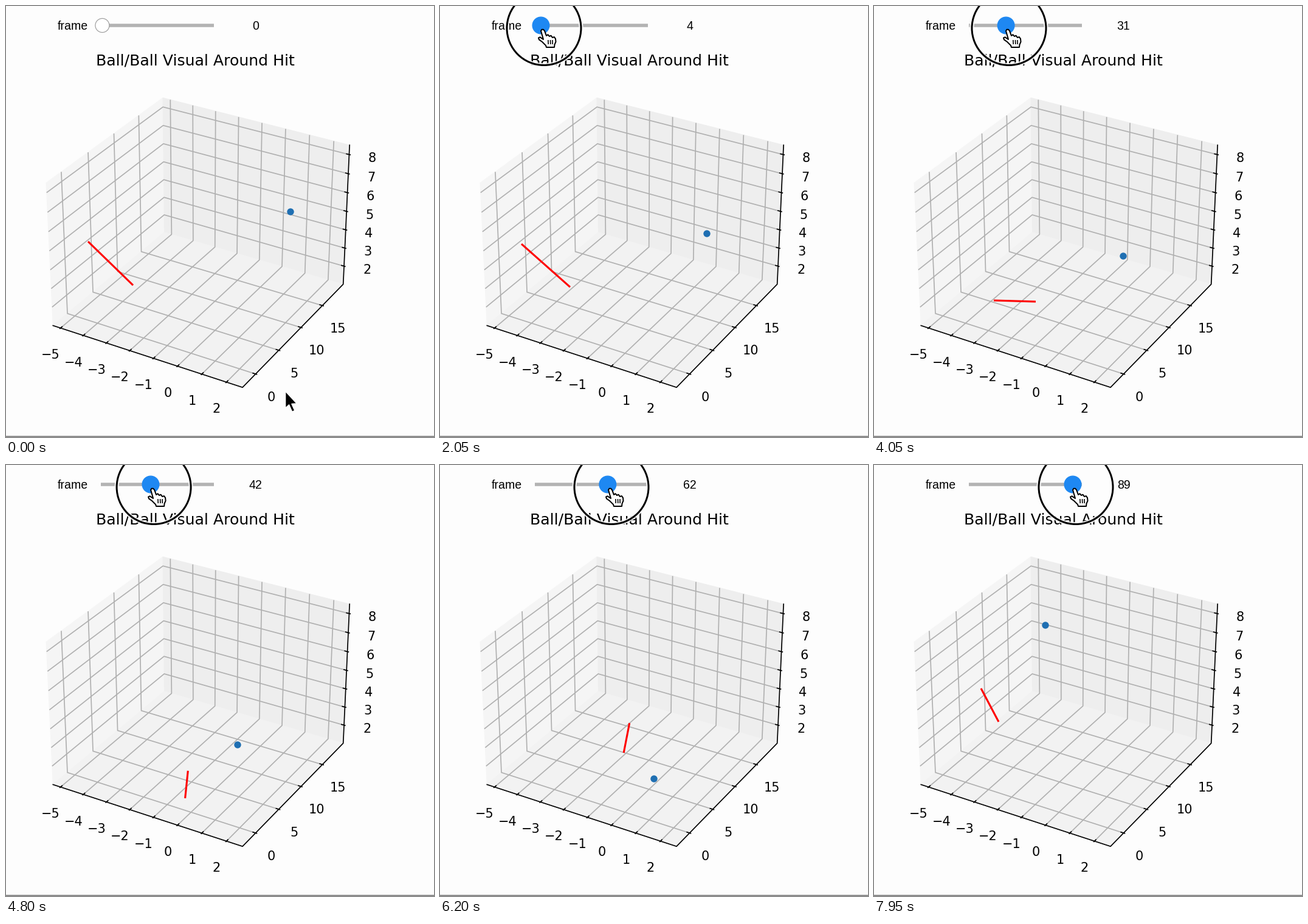
Animation of 704 by 710 pixels, one loop 8000 ms. Source, as a matplotlib script:

```python
import numpy as np
import matplotlib.pyplot as plt
from matplotlib.animation import FuncAnimation
from matplotlib.patches import Circle, Polygon

W, H, DPI = 704, 710, 64
STEP, FRAMES = 50, 160
PT = 72 / DPI  # points per pixel

fig = plt.figure(figsize=(W / DPI, H / DPI), dpi=DPI, facecolor="#fdfdfd")
ax = fig.add_axes([0, 0, 1, 1])
ax.set_xlim(0, W)
ax.set_ylim(H, 0)
ax.axis("off")


def label(x, y, text, size, font="DejaVu Sans", ha="center", z=4):
    return ax.text(x, y, text, fontsize=size * PT, family=font, ha=ha,
                   va="baseline", color="black", zorder=z)


def stroke(points, color, width, z, cap="butt"):
    xs, ys = zip(*points)
    return ax.plot(xs, ys, color=color, lw=width * PT, zorder=z,
                   solid_capstyle=cap, solid_joinstyle="round")[0]


# --- 3D box: perspective camera at elevation 30, azimuth -60 ---
LO = np.array([-5.334, -2.736, 0.9885])
HI = np.array([2.6445, 20.056, 8.49])
SPAN = HI - LO
HALF = np.array([4, 4, 3]) / 7
RIGHT = np.array([0.866, 0.5, 0])
UP = np.array([-0.25, 0.433, 0.866])
TOWARD = np.array([0.433, -0.75, 0.5])


def project(point):
    p = (2 * (np.array(point) - LO) / SPAN - 1) * HALF
    depth = 9.6 - TOWARD @ p
    return 320.4 + 3000 * (RIGHT @ p) / depth, 378.3 - 3000 * (UP @ p) / depth


def path(*points):
    return [project(p) for p in points]


x0, y0, z0 = LO
x1, y1, z1 = HI

panes = [
    ("#f5f5f5", path((x0, y0, z0), (x0, y1, z0), (x0, y1, z1), (x0, y0, z1))),
    ("#eeeeee", path((x0, y1, z0), (x1, y1, z0), (x1, y1, z1), (x0, y1, z1))),
    ("#f2f2f2", path((x0, y0, z0), (x1, y0, z0), (x1, y1, z0), (x0, y1, z0))),
]
for color, corners in panes:
    ax.add_patch(Polygon(corners, fc=color, ec=color, lw=PT, zorder=1))


def tick(point, axis, outward, offset):
    """Short mark across the box edge, with its number beside it."""
    ends = []
    for amount in (0.008 * outward, -0.016 * outward):
        end = np.array(point, float)
        end[axis] += amount * SPAN[axis]
        ends.append(project(end))
    stroke(ends, "black", 1.7, 4)
    px, py = project(point)
    return px + offset[0], py + offset[1] + 7.6


def number(n):
    return str(n).replace("-", "\u2212")


GRID, TICK_SIZE = "#b0b0b0", 20.9
for x in range(-5, 3):
    stroke(path((x, y0, z0), (x, y1, z0), (x, y1, z1)), GRID, 1.7, 2)
    label(*tick((x, y0, z0), 1, -1, (-16.2, 43.2)), number(x), TICK_SIZE)
for y in range(0, 16, 5):
    stroke(path((x1, y, z0), (x0, y, z0), (x0, y, z1)), GRID, 1.7, 2)
    label(*tick((x1, y, z0), 0, 1, (25.5, 37.3)), number(y), TICK_SIZE)
for z in range(2, 9):
    stroke(path((x0, y0, z), (x0, y1, z), (x1, y1, z)), GRID, 1.7, 2)
    label(*tick((x1, y1, z), 0, 1, (37.9, 4.7)), number(z), TICK_SIZE)
stroke(path((x0, y0, z0), (x1, y0, z0), (x1, y1, z0), (x1, y1, z1)),
       "black", 1.7, 4, "projecting")

label(311.8, 98, "Ball/Ball Visual Around Hit", 25.1)
stroke([(0, 709), (W, 709)], "#777777", 1.6, 4)

# --- slider ---
label(84.5, 39.3, "frame", 19.5, "Liberation Sans", "left")
stroke([(156, 32), (342, 32)], "#b3b3b3", 5.5, 4)
readout = label(410.5, 39.3, "0", 19.5, "Liberation Sans")
knob = ax.add_patch(Circle((158, 32), 11.5, lw=1.2 * PT, zorder=6))
BLUE = "#1e88f2"

# --- moving parts of the plot ---
bat = stroke([(0, 0), (1, 1)], "red", 3.1, 5)
ball = ax.add_patch(Circle((0, 0), 5.7, fc="#1f6fb2", lw=0, zorder=5))

# --- pointer ---
halo = ax.add_patch(Circle((0, 0), 61, fc="none", ec="white", lw=7 * PT, zorder=8))
ring = ax.add_patch(Circle((0, 0), 61, fc="none", ec="black", lw=3 * PT, zorder=9))
ARROW = np.array([(0, 0), (0, 28), (6, 22.5), (11, 34), (15.5, 32),
                  (10.5, 21), (19, 20.5)])
HAND = np.array([(-5, 3), (-3.5, 0.7), (-1, 0.7), (1, 3), (4, 11), (6.5, 9.2),
                 (9, 12), (11.5, 10.7), (14, 14), (16.8, 13), (19, 16),
                 (19.5, 21), (17.5, 25.5), (17, 30), (4, 30), (3, 27),
                 (-3, 21), (-8, 17.5), (-9, 14.5), (-6.5, 13.3), (-1, 17)])
FOLDS = np.array([(6.8, 18), (7.2, 25), (np.nan, np.nan), (10.5, 18),
                  (10.8, 25), (np.nan, np.nan), (14, 18), (14.2, 25)])
arrow = ax.add_patch(Polygon(ARROW, fc="black", ec="white", lw=1.6 * PT,
                             joinstyle="round", zorder=11))
hand = ax.add_patch(Polygon(HAND, fc="white", ec="black", lw=2 * PT,
                            joinstyle="round", zorder=11))
folds = stroke(FOLDS, "black", 1.6, 12)

# Drag: time, slider value, pointer x
DRAG = np.array([(1450, 0, 160), (2050, 4, 171), (2300, 6, 174.5),
                 (3050, 14, 192), (3150, 16, 193.5), (4050, 31, 222),
                 (4850, 43, 244.5), (5550, 53, 265), (5700, 55, 267),
                 (6900, 73, 303), (7950, 89, 332)]).T

# Bat: slider value, grip x and y, tip x and y
SWING = np.array([(0, 209, 460, 135, 388), (4, 214, 463, 134, 392),
                  (14, 243, 481, 142, 421), (31, 266, 487, 197, 485),
                  (43, 302, 505, 305, 553), (53, 324, 514, 424, 580),
                  (55, 322, 507, 415, 522), (61, 305, 478, 325, 425),
                  (67, 288, 457, 255, 428), (73, 271, 440, 224, 441),
                  (89, 205, 423, 176, 368)], float).T

# The ball is sampled more coarsely than the bat
BALL = [(468, 339), (439, 375), (410, 412), (381, 461), (352, 517),
        (309, 361), (282, 264)]


def smooth(x, xs, ys):
    """Monotone cubic interpolation."""
    h = np.diff(xs)
    d = np.diff(ys) / h
    m = np.concatenate([d[:1], np.zeros(len(d) - 1), d[-1:]])
    for i in range(1, len(d)):
        if d[i - 1] * d[i] > 0:
            m[i] = 2 * d[i - 1] * d[i] / (d[i - 1] + d[i])
    i = int(np.clip(np.searchsorted(xs, x, side="right") - 1, 0, len(h) - 1))
    s = (x - xs[i]) / h[i]
    return ((1 + 2 * s) * (1 - s) ** 2 * ys[i] + s * (1 - s) ** 2 * h[i] * m[i]
            + s * s * (3 - 2 * s) * ys[i + 1] + s * s * (s - 1) * h[i] * m[i + 1])


def pointer_at(t):
    if t > 900:
        return np.interp(t, DRAG[0], DRAG[2]), 38
    s = np.clip((t - 50) / 850, 0, 1)
    s = s * s * (3 - 2 * s)
    return 459.5 + (160 - 459.5) * s, 634.5 + (38 - 634.5) * s


def update(n):
    t = n * STEP
    value = int(round(np.interp(t, DRAG[0], DRAG[1])))
    px, py = pointer_at(t)
    hover = np.hypot(px - 158, py - 32) < 13 or t > 900
    press = np.clip((t - 1050) / 200, 0, 1)

    readout.set_text(str(value))
    knob.center = (158.4 + 1.894 * value, 32)
    knob.set_radius(13.9 if press > 0 else 11.5)
    knob.set_facecolor(BLUE if hover else "white")
    knob.set_edgecolor(BLUE if hover else "#9e9e9e")

    gx, gy, tx, ty = (smooth(value, SWING[0], row) for row in SWING[1:])
    bat.set_data([gx, tx], [gy, ty])
    ball.center = BALL[value // 16 + 1 if value else 0]

    for circle, alpha in ((halo, 0.85), (ring, 1)):
        circle.center = (px, py - 1.5)
        circle.set_radius(61 * (0.5 + 0.5 * press))
        circle.set_alpha(alpha * press)
        circle.set_visible(press > 0)

    arrow.set_visible(not hover)
    hand.set_visible(hover)
    folds.set_visible(hover)
    arrow.set_xy(ARROW + (px, py))
    hand.set_xy(HAND + (px, py))
    folds.set_data(*(FOLDS + (px, py)).T)
    return ()


anim = FuncAnimation(fig, update, frames=FRAMES, interval=STEP,
                     init_func=lambda: update(0), repeat=True, repeat_delay=0,
                     blit=False)
plt.show()
```
